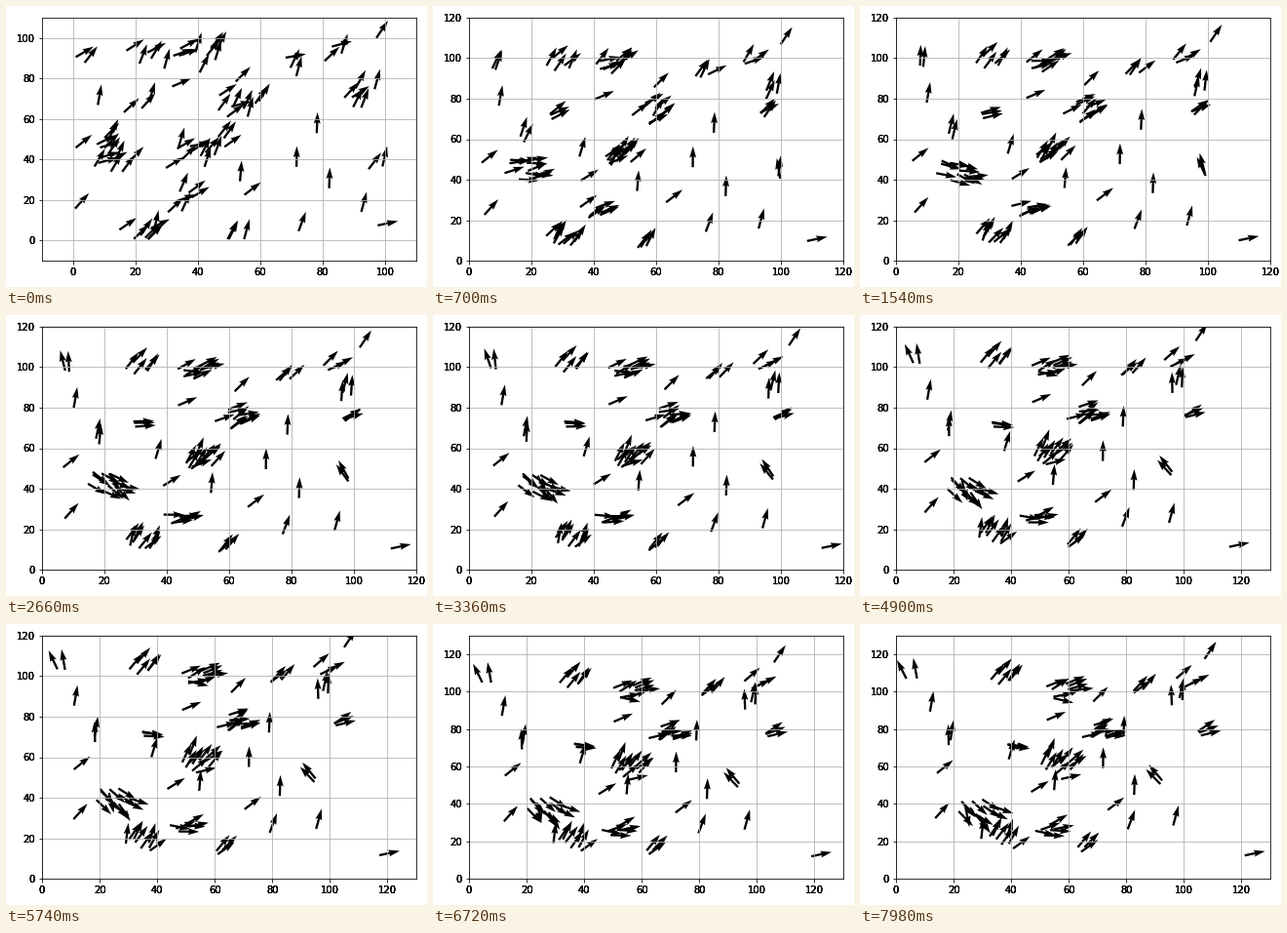
Recreate the animation shown at these times as a matplotlib script. Size 432 by 288 pixels, loop 8000 ms.

```python
import numpy as np
import matplotlib.pyplot as plt
from matplotlib.animation import FuncAnimation
from matplotlib.artist import Artist

W, H, DPI = 432, 288, 72
TICK, STEP, LOOP = 40, 140, 8000      # ms
STEPS = LOOP // STEP + 1
MID = 30                              # step at which birds sit at their anchors
BIRDS = 100
SPEED = 0.25
ALIGN = 10                            # steps a bird needs to join its flock's heading

# count, centre x, centre y, common heading
FLOCKS = [
    (8, 32, 15.5, 66), (12, 22, 42, -50), (11, 52, 55, 42), (9, 62, 75, 18),
    (9, 50, 100, 8), (6, 45, 27, 15), (5, 32, 102, 50), (3, 32, 72, -12),
    (3, 59, 12, 40), (3, 98, 76, 12), (3, 97, 88, 85), (3, 94, 102, 20),
    (3, 79, 95, 40), (2, 8, 101, 110), (2, 18.5, 66, 82), (2, 96, 46, 130),
]
# The two birds that push the axes outwards: x, y, heading
LEADERS = [(114.5, 11, 12), (103.4, 112, 56)]

rng = np.random.default_rng(4)


def unit(deg):
    a = np.radians(deg)
    return np.stack([np.cos(a), np.sin(a)], axis=-1)


def flock(n, x, y, heading):
    """Columns: x, y, first heading, final heading."""
    r = 1.8 * np.sqrt((n - 1) * rng.random(n))
    spots = (x, y) + r[:, None] * unit(rng.uniform(0, 360, n))
    final = heading + rng.normal(0, 3 + 1.6 * n, n)
    return np.column_stack([spots, rng.uniform(10, 80, n), final])


def loners(count):
    """Single birds fill the widest gaps between the flocks."""
    taken = [f[1:3] for f in FLOCKS] + [b[:2] for b in LEADERS]
    birds = list(LEADERS)
    while len(birds) < count:
        tries = rng.uniform((8, 14), (104, 96), (40, 2))
        gaps = np.linalg.norm(tries[:, None] - np.array(taken), axis=2)
        spot = tries[gaps.min(axis=1).argmax()]
        taken.append(tuple(spot))
        birds.append((*spot, rng.uniform(10, 90)))
    x, y, h = np.array(birds).T
    return np.column_stack([x, y, h, h])


def simulate():
    flocked = np.vstack([flock(*f) for f in FLOCKS])
    birds = np.vstack([flocked, loners(BIRDS - len(flocked))])
    first, final = birds[:, 2], birds[:, 3]
    ease = np.exp(-np.arange(STEPS) / ALIGN)[:, None]
    dirs = unit(final + (first - final) * ease)
    path = np.cumsum(SPEED * dirs, axis=0)
    pos = birds[:, :2] + path - path[MID]
    # The first step uses the raw random velocity, later ones a fixed speed.
    leap = 10 / dirs[0].max(axis=1) * np.sqrt(rng.random(BIRDS))
    pos[0] = np.clip(pos[1] - leap[:, None] * dirs[0], 0.6, 100)
    return pos, dirs


class HeavyLabels(Artist):
    """Draws the tick labels again so that their soft edges darken."""

    def draw(self, renderer):
        for label in ax.get_xticklabels() + ax.get_yticklabels():
            for _ in range(4):
                label.draw(renderer)


pos, dirs = simulate()

fig = plt.figure(figsize=(W / DPI, H / DPI), dpi=DPI, facecolor="white")
ax = fig.add_axes([37 / W, 27 / H, 384 / W, 249 / H])
ax.grid()
heavy = HeavyLabels()
heavy.set_zorder(5)
fig.add_artist(heavy)
arrows = ax.quiver(*pos[0].T, *dirs[0].T, scale=18, width=0.006, color="black")


def draw(i):
    step = min((i * TICK + TICK // 2) // STEP, STEPS - 1)
    low = 0 if step else -10
    high = 10 * np.round(pos[step].max(axis=0) / 10) + 10
    ax.set_xticks(np.arange(0, high[0] + 1, 20))
    ax.set_yticks(np.arange(0, high[1] + 1, 20))
    ax.set_xlim(low, high[0])
    ax.set_ylim(low, high[1])
    arrows.set_offsets(pos[step])
    arrows.set_UVC(*dirs[step].T)
    return arrows,


anim = FuncAnimation(fig, draw, frames=LOOP // TICK, interval=TICK,
                     repeat=True, repeat_delay=0, blit=False)
plt.show()
```
